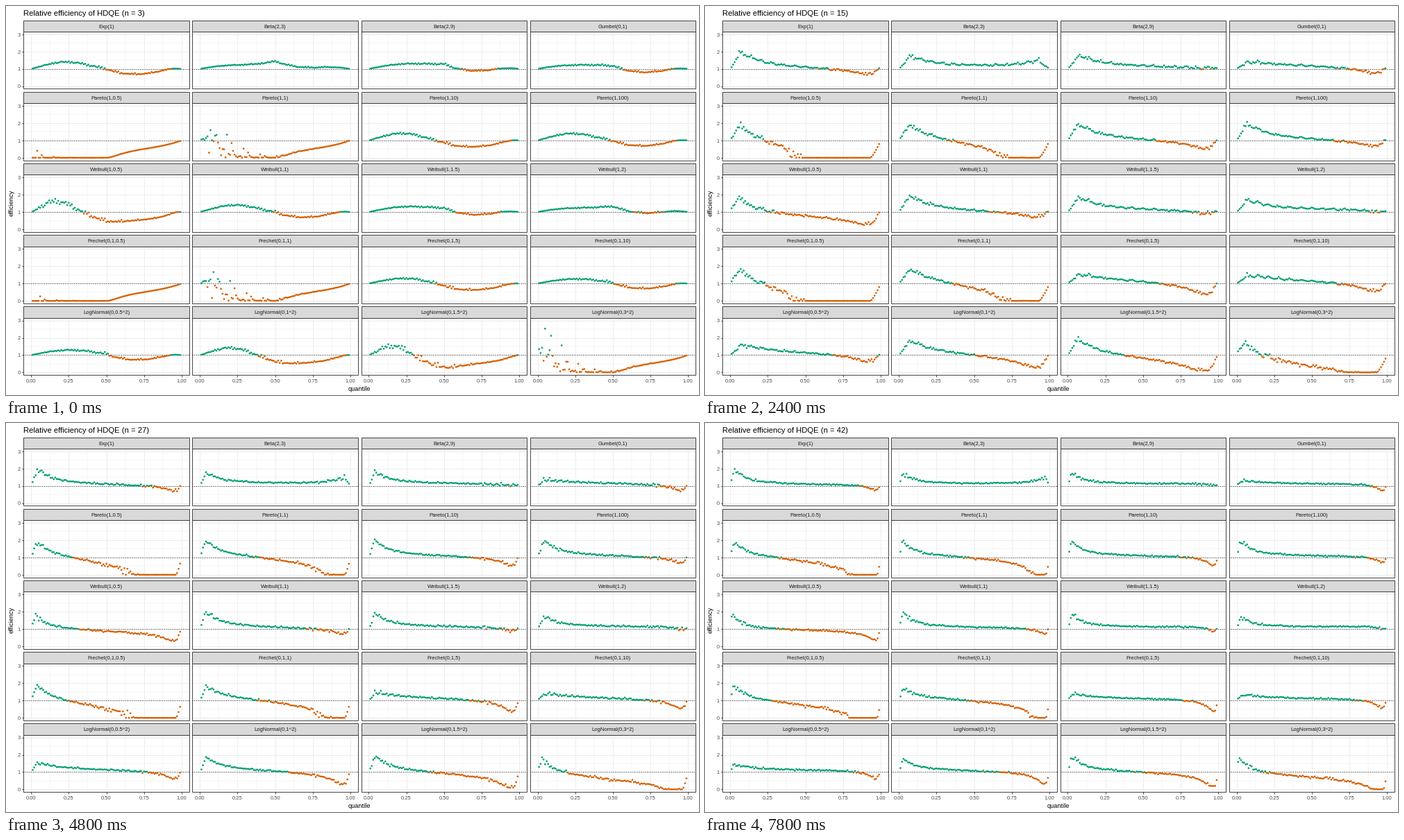
These frames come from a looping animation (998x561 px, 8 s). A matplotlib script:

```python
import math

import numpy as np
import matplotlib.pyplot as plt
from matplotlib.animation import FuncAnimation
from matplotlib.patches import Rectangle

W, H, DPI = 998, 561, 100
PX = 72 / DPI
SIZES = range(3, 43)
GROUPS, REPS = 11, 1000
P = np.arange(1, 100) / 100
GREEN, ORANGE = (0, 158 / 255, 115 / 255), (213 / 255, 94 / 255, 0)

plt.rcParams["font.family"] = ["Liberation Sans", "DejaVu Sans"]

# --- distributions, each as a quantile function ---------------------------

z_grid = np.linspace(-6, 6, 4001)
z_cdf = np.array([0.5 * math.erfc(-z / math.sqrt(2)) for z in z_grid])


class Probs:
    """Probabilities with the transforms shared by the quantile functions."""

    def __init__(self, u):
        self.u = u
        self.upper = -np.log1p(-u)
        self.lower = -np.log(u)
        self.z = np.interp(u, z_cdf, z_grid)


def beta2(b):
    x = np.linspace(0, 1, 4001)
    cdf = 1 - (1 - x) ** b * (1 + b * x)
    return lambda s: np.interp(s.u, cdf, x)


def pareto(a):
    return lambda s: np.exp(s.upper / a)


def weibull(k):
    return lambda s: s.upper ** (1 / k)


def frechet(a):
    return lambda s: s.lower ** (-1 / a)


def log_normal(sd):
    return lambda s: np.exp(sd * s.z)


DISTS = [
    ("Exp(1)", lambda s: s.upper),
    ("Beta(2,3)", beta2(3)),
    ("Beta(2,9)", beta2(9)),
    ("Gumbel(0,1)", lambda s: -np.log(s.lower)),
]
DISTS += [(f"Pareto(1,{a})", pareto(a)) for a in (0.5, 1, 10, 100)]
DISTS += [(f"Weibull(1,{k})", weibull(k)) for k in (0.5, 1, 1.5, 2)]
DISTS += [(f"Frechet(0,1,{a})", frechet(a)) for a in (0.5, 1, 5, 10)]
DISTS += [(f"LogNormal(0,{s}^2)", log_normal(s)) for s in (0.5, 1, 1.5, 3)]

# --- quantile estimators as weights of the order statistics ---------------

u_grid = np.linspace(-7.5, 7.5, 3001)
logit = np.sinh(u_grid)
log_t, log_1t = -np.logaddexp(0, -logit), -np.logaddexp(0, logit)
log_jac = np.log(np.cosh(u_grid))


def harrell_davis(n):
    a = (n + 1) * P[:, None]
    log_f = a * log_t + (n + 1 - a) * log_1t + log_jac
    f = np.exp(log_f - log_f.max(axis=1, keepdims=True))
    cdf = np.cumsum(f, axis=1) - f / 2
    cdf /= f.sum(axis=1, keepdims=True)
    k = np.arange(1, n) / n
    cuts = np.log(k / (1 - k))
    inner = np.array([np.interp(cuts, logit, row) for row in cdf])
    return np.diff(inner, axis=1, prepend=0, append=1)


def linear_type7(n):
    return np.maximum(0, 1 - abs(np.arange(n) - (n - 1) * P[:, None]))


def by_group(w):
    return w.reshape(-1, GROUPS, w.shape[1]).transpose(1, 2, 0)


def efficiency(n):
    """Simulated MSE ratio, one row of 99 values per distribution."""
    u = np.random.default_rng(n).random((GROUPS, REPS, n))
    sample = Probs(np.sort(np.clip(u, 1e-12, None), axis=2))
    weights = [by_group(linear_type7(n)), by_group(harrell_davis(n))]
    rows = []
    for i, (_, quantile) in enumerate(DISTS):
        x = np.roll(quantile(sample), 3 * i, axis=0)
        true = quantile(Probs(P)).reshape(-1, GROUPS).T[:, None, :]
        mse = [((x @ w - true) ** 2).mean(axis=1) for w in weights]
        rows.append((mse[0] / mse[1]).T.ravel())
    return np.array(rows)


EFF = [efficiency(n) for n in SIZES]

# --- stage -----------------------------------------------------------------

fig = plt.figure(figsize=(W / DPI, H / DPI), dpi=DPI, facecolor="white")
ax = fig.add_axes([0, 0, 1, 1])
ax.set_xlim(0, W)
ax.set_ylim(H, 0)
ax.axis("off")

PANEL_W, PANEL_H, STRIP_H = 238.3, 82.4, 16.4
UNIT_X, UNIT_Y = PANEL_W / 1.1, PANEL_H / 3.3


def panel_origin(i):
    return 25.4 + 243.1 * (i % 4), 37 + 103.2 * (i // 4)


def to_px(i, x, y):
    left, top = panel_origin(i)
    return left + (x + 0.05) * UNIT_X, top + (3.15 - y) * UNIT_Y


def line(xs, ys, color, width, z, **kw):
    ax.plot(xs, ys, color=color, lw=width * PX, zorder=z,
            solid_capstyle="butt", dash_capstyle="butt", **kw)


def label(x, y, text, size, color, ha="center", **kw):
    return ax.text(x, y, text, fontsize=size * PX, color=color, ha=ha,
                   va="baseline", zorder=6, **kw)


def box(x, y, w, h, fill, z):
    ax.add_patch(Rectangle((x, y), w, h, facecolor=fill, edgecolor="#333333",
                           lw=0.9 * PX, zorder=z))


def draw_panel(i, name):
    left, top = panel_origin(i)
    right, bottom = left + PANEL_W, top + PANEL_H
    for k in range(9):
        x = to_px(i, k / 8, 0)[0]
        line([x, x], [top, bottom], "#ebebeb", 0.45 if k % 2 else 0.9, 1)
    for k in range(7):
        y = to_px(i, 0, k / 2)[1]
        line([left, right], [y, y], "#ebebeb", 0.45 if k % 2 else 0.9, 1)
    y = to_px(i, 0, 1)[1]
    line([left, right], [y, y], "black", 0.9, 2, ls=(0, (1, 2)))
    box(left, top, PANEL_W, PANEL_H, "none", 4)
    box(left, top - STRIP_H, PANEL_W, STRIP_H, "#d9d9d9", 5)
    label(left + PANEL_W / 2, top - 5.4, name, 7.7, "#1a1a1a")
    if i % 4 == 0:
        for v in range(4):
            y = to_px(i, 0, v)[1]
            line([left - 2.6, left], [y, y], "#333333", 0.9, 3)
            label(left - 4.6, y + 2.8, str(v), 7.7, "#4d4d4d", "right")
    if i >= 16:
        for k in range(5):
            x = to_px(i, k / 4, 0)[0]
            line([x, x], [bottom, bottom + 2.6], "#333333", 0.9, 3)
            label(x, 542.8, f"{k / 4:.2f}", 7.7, "#4d4d4d")


for i, (name, _) in enumerate(DISTS):
    draw_panel(i, name)

title = label(25, 13.7, "", 11.2, "black", "left")
label(509, 554.6, "quantile", 9.2, "black")
ax.text(12.3, 284, "efficiency", fontsize=9.2 * PX, rotation=90,
        ha="right", va="center", zorder=6)

dots = ax.scatter(np.zeros(P.size * len(DISTS)), np.zeros(P.size * len(DISTS)),
                  s=(2.7 * PX) ** 2, linewidths=0, zorder=3)


def update(frame):
    eff = EFF[frame]
    dots.set_offsets(np.vstack([np.column_stack(to_px(i, P, row))
                                for i, row in enumerate(eff)]))
    dots.set_facecolor(np.where(eff.reshape(-1, 1) > 1, GREEN, ORANGE))
    title.set_text(f"Relative efficiency of HDQE (n = {SIZES[frame]})")
    return dots, title


anim = FuncAnimation(fig, update, frames=len(SIZES), interval=200,
                     init_func=lambda: update(0), repeat=True, repeat_delay=0)
plt.show()
```
